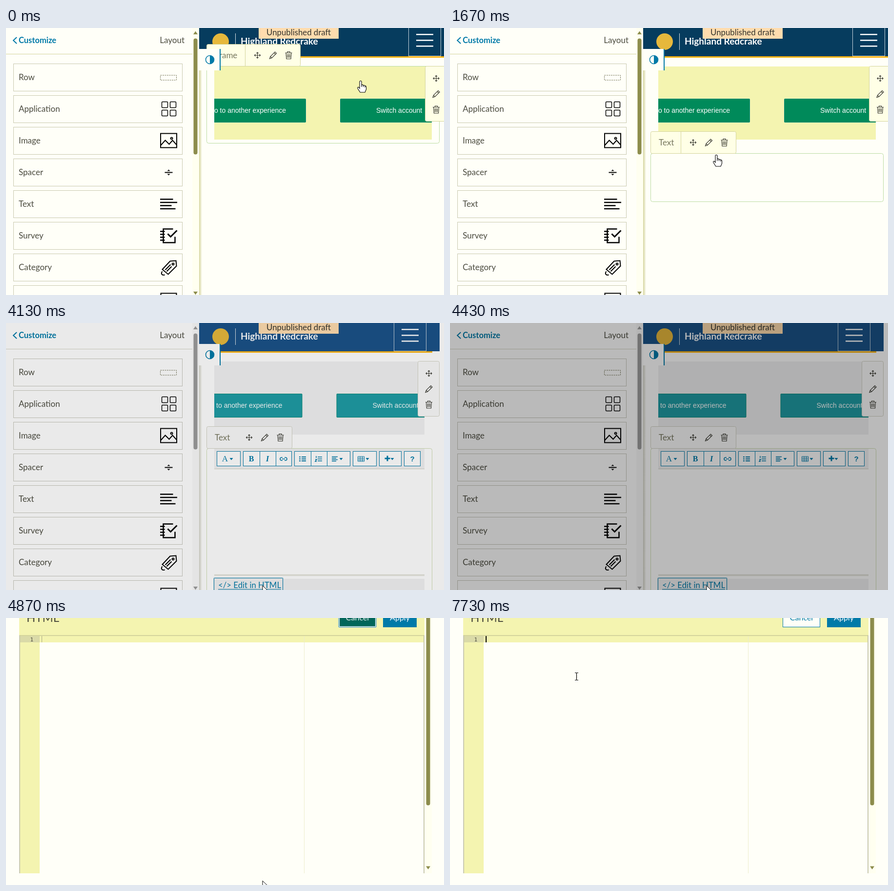
An HTML page with a canvas for the animation above (8000 ms loop, 898 px wide and 548 px high).

```html
<!DOCTYPE html>
<html lang="en">
<head>
<meta charset="utf-8">
<title>Layout editor</title>
<style>
html, body { margin: 0; width: 100%; height: 100%; overflow: hidden; background: #fffff8; }
canvas { display: block; width: 898px; height: 548px; }
</style>
</head>
<body>
<canvas id="stage" width="898" height="548"></canvas>
<script>
const W = 898, H = 548, LOOP = 8000;
const out = document.getElementById('stage').getContext('2d');
const layer = document.createElement('canvas');
layer.width = W;
layer.height = H;
const off = layer.getContext('2d');
let c = out;

// warm tints in full light, neutral ones while dimmed
const WARM = { paper: '#fffff8', soft: '#ffffe6', panel: '#f4f4b0', edge: '#d4d49c', row: '#c9c9b0',
  thumb: '#8c8c4c', track: '#fffff0', navy: '#063c5e', button: '#008a5a', cell: '#dadaa8' };
const COOL = { paper: '#ffffff', soft: '#fafafa', panel: '#f1f1f2', edge: '#d2d2c4', row: '#c6c6bc',
  thumb: '#9c9c9c', track: '#f8f8f8', navy: '#1a5288', button: '#1f9ca4', cell: '#dcdcdc' };
let pal = WARM;

const BLUE = '#007aa8', INK = '#4c4c40';
const SANS = 'Lato, sans-serif', ARIAL = '"Liberation Sans", Arial, sans-serif';
const SERIF = '"Liberation Serif", serif', MONO = '"DejaVu Sans Mono", monospace';

const clamp = v => Math.max(0, Math.min(1, v));
const ramp = (t, a, b) => clamp((t - a) / (b - a));
const smooth = p => p * p * (3 - 2 * p);

function box(x, y, w, h, fill) {
  c.fillStyle = fill;
  c.fillRect(x, y, w, h);
}
function frame(x, y, w, h, color, lw = 1) {
  c.strokeStyle = color;
  c.lineWidth = lw;
  c.strokeRect(x + .5, y + .5, w - 1, h - 1);
}
function round(x, y, w, h, r, fill, stroke) {
  c.beginPath();
  c.roundRect(x + .5, y + .5, w - 1, h - 1, r);
  if (fill) { c.fillStyle = fill; c.fill(); }
  if (stroke) { c.strokeStyle = stroke; c.lineWidth = 1; c.stroke(); }
}
function text(s, x, y, font, color, align = 'left') {
  c.font = font;
  c.fillStyle = color;
  c.textAlign = align;
  c.fillText(s, x, y);
}
// SVG path centred on x, y
function icon(d, x, y, stroke, lw = 1, fill) {
  const p = new Path2D(d);
  c.save();
  c.translate(x, y);
  if (fill) { c.fillStyle = fill; c.fill(p); }
  if (stroke) { c.strokeStyle = stroke; c.lineWidth = lw; c.stroke(p); }
  c.restore();
}
function disc(x, y, r, fill) {
  c.fillStyle = fill;
  c.beginPath();
  c.arc(x, y, r, 0, 7);
  c.fill();
}

const MOVE = 'M-6 0H6M0-6V6M-4-2L-6 0L-4 2M4-2L6 0L4 2M-2-4L0-6L2-4M-2 4L0 6L2 4';
const PENCIL = 'M-7 7L-5.500 2.500L4-7L7-4L-2.500 5.500ZM2-5L5-2M-5.500 2.500L-2.500 5.500';
const TRASH = 'M-7-5H7M-2.500-5V-7.500H2.500V-5M-5.500-5L-4.500 7.500H4.500L5.500-5M-2.500-2.500V5M0-2.500V5M2.500-2.500V5';
const DOWN = 'M-3.500-2H3.500L0 2.500Z', UP = 'M-4.500 3H4.500L0-3.500Z', DROP = 'M-4.500-3H4.500L0 3.500Z';
const HAND = 'M-2 12V1.500A2 2 0 0 1 2 1.500V8C3 7 5 7 5.500 9C7 8 8.500 8.500 9 10C10.500 9.500 11.500 10.500 11.500 12V17L9 23H-1L-6 15C-7 13-5 11.500-3.500 13L-2 15ZM2 8V12M5.500 9V12M9 10V13';
const BEAM = 'M-3.500-7.500H-1L0-7L1-7.500H3.500M0-7V7M-3.500 7.500H-1L0 7L1 7.500H3.500';
const ARROW = 'M0 0V16L4 12.500L6.500 18.500L9 17.500L6.500 11.500H12Z';

const ROWS = ['Row', 'Application', 'Image', 'Spacer', 'Text', 'Survey', 'Category'];

function rowIcon(i, y) {
  const x = 333.5, K = '#000';
  if (i === 0) {
    c.setLineDash([3, 1.5]);
    frame(316, y - 5, 34, 11, '#77775c');
    c.setLineDash([]);
  } else if (i === 1) {
    for (const [dx, dy] of [[-14, -15], [3, -15], [-14, 2], [3, 2]]) {
      c.beginPath();
      c.roundRect(x + dx, y + dy, 12, 12, 1.5);
      c.strokeStyle = K;
      c.lineWidth = 1.5;
      c.stroke();
    }
  } else if (i === 2) {
    icon('M-16.500-15H16.500V14H-16.500ZM-16 9L-7-1L1 7L8-1L16 8M6-7a2 2 0 1 0 .1 0', x, y, K, 2);
  } else if (i === 3) {
    icon('M-8 0H8', x, y, K, 2);
    icon('M-3-3H3L0-6ZM-3 3H3L0 6Z', x, y, null, 1, K);
  } else if (i === 4) {
    icon('M-17.500-10H9M-17.500-3.500H17.500M-17.500 3H6M-17.500 9.500H14', x, y, K, 2.5);
  } else if (i === 5) {
    icon('M9-14H-11V14H13V2M-17.500-9H-8M-17.500-3H-8M-17.500 3H-8M-17.500 9H-8', x, y, K, 2.5);
    icon('M-2-4L4 2L17-11', x, y, K, 3);
  } else if (i === 6) {
    icon('M-13 4L3-13L15-14L16-3L-1 14ZM9-9a2 2 0 1 0 .1 0M-7 5L4-6M-4 8L6-2M-13 8C-17 13-13 17-8 15', x, y, K, 2);
  }
}

function sidebar() {
  box(0, 0, 396, H, pal.paper);
  icon('M4-6.500L-3 0L4 6.500', 18, 25.5, BLUE, 2);
  text('Customize', 26, 31, 'bold 16.500px ' + SANS, BLUE);
  text('Layout', 366, 31, '17px ' + SANS, INK, 'right');
  box(0, 53, 382, 1, pal.edge);
  for (let i = 0; i < 8; i++) {
    const y = 73 + 65 * i;
    frame(15, y, 347, 57, pal.row);
    if (i < 7) {
      text(ROWS[i], 26, y + 34, '17px ' + SANS, INK);
      rowIcon(i, y + 28.5);
    }
  }
  frame(317, 544, 33, 24, '#000', 2);
  box(382, 0, 14, H, pal.track);
  round(384, 21, 9, 239, 4, pal.thumb);
  icon(UP, 388.5, 10, null, 1, pal.thumb);
  icon(DROP, 388.5, 544, null, 1, pal.thumb);
  const g = c.createLinearGradient(396, 0, 402, 0);
  g.addColorStop(0, pal.edge);
  g.addColorStop(1, pal.paper);
  box(396, 87, 6, H, g);
}

function header(draftX, hamX, headR, lineR) {
  box(396, 0, headR - 396, 58, pal.navy);
  box(396, 58, lineR - 396, 3, '#fcb514');
  disc(440, 28, 17, '#e6b83c');
  box(470, 11, 1, 34, '#dfe6ea');
  text('Highland Redcrake', 481, 34, 'bold 19px ' + SANS, '#fff');
  frame(hamX, -1, 67, 59, '#c8d4dc');
  for (const y of [12, 24, 36]) box(hamX + 16, y, 35, 2.5, '#fff');
  box(draftX, 0, 164, 22, '#ffdcae');
  text('Unpublished draft', draftX + 82, 15, '16.800px ' + SANS, '#33332c', 'center');
}

function tools(x, y, vertical) {
  [MOVE, PENCIL, TRASH].forEach((d, i) =>
    icon(d, x + (vertical ? 0 : i * 32), y + (vertical ? i * 32 : 0), '#3c3c34', 1.2));
}

function tab(y, w, label, div) {
  round(411, y, w, 46, 3, pal.soft, pal.edge);
  text(label, 428, y + 29, '17px ' + SANS, '#77775f');
  if (div) box(div, y + 1, 1, 44, pal.edge);
  tools((div || 473) + 25.5, y + 23);
}

function cards(d, clipR, toolX) {
  c.save();
  c.beginPath();
  c.rect(427, 79, clipR - 427, 150);
  c.clip();
  box(427, 79, 460, 150, pal.panel);
  for (const [x, w] of [[400, 215], [685, 220]]) {
    round(x + d, 145, w, 49, 1, pal.button, '#0a8a78');
  }
  text('Go to another experience', 574 + d, 174, '14px ' + ARIAL, '#fff', 'right');
  text('Switch account', 759 + d, 174, '14px ' + ARIAL, '#fff');
  c.restore();
  round(toolX, 78, 45, 114, 3, pal.soft, pal.edge);
  tools(toolX + 23, 103.5, true);
}

function editor() {
  round(411, 257, 463, 320, 4, pal.paper, '#cfdcb4');
  box(427, 258, 431, 42, pal.panel);
  box(427, 299, 431, 1, pal.edge);
  for (const g of [[432, 481], [486, 520, 553, 586], [591, 625, 658, 706], [711, 760], [765, 811], [816, 850]]) {
    box(g[0], 263, g.at(-1) - g[0], 31, pal.paper);
    for (let i = 1; i < g.length; i++) frame(g[i - 1], 263, g[i] - g[i - 1] + (i < g.length - 1), 31, BLUE);
  }
  text('A', 449, 284, '17px ' + SERIF, BLUE, 'center');
  text('B', 503, 284, 'bold 16px ' + SERIF, BLUE, 'center');
  text('I', 536, 284, 'italic bold 16px ' + SERIF, BLUE, 'center');
  icon('M-2-3H-4A3 3 0 0 0-4 3H-2M2-3H4A3 3 0 0 1 4 3H2M-3 0H3', 569, 279, BLUE, 1.6);
  icon('M-7-4H-4M-7 0H-4M-7 4H-4M-2-4H7M-2 0H7M-2 4H7', 608, 279, BLUE, 2);
  icon('M-5-6V-2M-7 1H-4L-7 5H-4M-2-4H7M-2 0H7M-2 4H7', 641, 279, BLUE, 1.5);
  icon('M-6-4.500H6M-6-1.500H3M-6 1.500H6M-6 4.500H3', 674, 279, BLUE, 1.5);
  icon('M-6.500-5H6.500V5H-6.500ZM-6.500-1.500H6.500M-6.500 2H6.500M-2-5V5M2.500-5V5', 728, 279, BLUE, 1);
  icon('M-5.500 0H5.500M0-5.500V5.500', 782, 278, BLUE, 3);
  for (const x of [462, 687, 741, 792]) icon(DOWN, x, 279, null, 1, BLUE);
  text('?', 833, 284, 'bold 15px ' + ARIAL, BLUE, 'center');
  box(427, 516, 431, 1, pal.edge);
  box(427, 518, 431, 1, pal.edge);
  box(427, 525, 431, 23, pal.panel);
}

function link(focused) {
  if (focused) {
    round(425, 522, 144, 32, 1, '#b4d4e2');
    round(426, 523, 142, 30, 1, pal.panel, BLUE);
  }
  const font = '16.800px ' + SANS, label = '</> Edit in HTML';
  text(label, 435, 544, font, BLUE);
  box(435, 546, c.measureText(label).width, 1, BLUE);
}

function contrastTab() {
  box(396, 43, 44, 44, pal.paper);
  box(438, 43, 2, 44, BLUE);
  c.beginPath();
  c.arc(418, 65, 8.5, 0, 7);
  c.strokeStyle = BLUE;
  c.lineWidth = 1.6;
  c.stroke();
  icon('M0-8.500A8.500 8.500 0 0 1 0 8.500Z', 418, 65, null, 1, BLUE);
}

// mode: frame, text, edit, modal
function page(mode) {
  const wide = mode === 'frame' || mode === 'text';
  box(0, 0, W, H, pal.paper);
  if (wide) header(518, 825, W, W);
  else if (mode === 'edit') header(511, 810, 889, 889);
  else header(518, 795, 889, 874);
  if (mode === 'frame') round(411, 78, 478, 159, 4, null, '#bcdca4');
  if (wide) cards(0, 873, 859);
  else cards(-7.5, 858, 844);
  if (mode === 'frame') tab(33, 193, 'Frame', 490);
  else {
    if (wide) round(411, 257, 478, 100, 4, pal.paper, '#bcdca4');
    else {
      editor();
      link(mode === 'modal');
    }
    tab(212, 176, 'Text', wide ? 473 : 0);
  }
  if (mode === 'edit') {
    box(889, 0, 9, H, pal.track);
    round(892, -8, 9, 522, 4, pal.thumb);
    icon(DROP, 895, 544, null, 1, pal.thumb);
  }
  contrastTab();
  sidebar();
}

function modal(dy, focus, caret) {
  c.save();
  c.translate(0, dy);
  box(0, -200, W, 755, pal.paper);
  box(27, -60, 831, 96, pal.panel);
  text('HTML', 42, 8, '24px ' + SANS, '#4a4a3c');
  box(683, -21, 75, 39, pal.paper);
  frame(682, -22, 77, 41, BLUE);
  text('Cancel', 720.5, 5, '16px ' + SANS, BLUE, 'center');
  if (focus > 0) {
    c.globalAlpha = focus;
    round(681, -22, 79, 42, 2, '#5aa4c4');
    box(683, -22, 75, 40, '#fff');
    box(684, -22, 73, 39, '#00665a');
    text('Cancel', 720.5, 5, '16px ' + SANS, '#e8f4f0', 'center');
    c.globalAlpha = 1;
  }
  box(773, -22, 69, 41, BLUE);
  text('Apply', 807.5, 5, '16px ' + SANS, '#fff', 'center');
  box(28, 36, 41, 488, pal.panel);
  box(69, 37, 788, 13, pal.panel);
  box(29, 37, 40, 13, pal.cell);
  text('1', 56, 48, '11px ' + MONO, '#4a4a3c', 'right');
  box(27, 35, 831, 2, pal.edge);
  box(27, 36, 2, 488, pal.row);
  box(856, 36, 2, 488, pal.row);
  box(611, 38, 1, 486, '#ececcc');
  box(73, 37, caret ? 2 : 1, 13, caret ? '#000' : '#a8a884');
  box(858, -100, 15, 624, pal.track);
  round(861, -100, 9, 485, 4, pal.thumb);
  icon(DROP, 865.5, 512.5, null, 1, pal.thumb);
  c.restore();
}

function over(alpha, draw) {
  if (alpha <= 0) return;
  off.clearRect(0, 0, W, H);
  c = off;
  draw();
  c = out;
  out.globalAlpha = alpha;
  out.drawImage(layer, 0, 0);
  out.globalAlpha = 1;
}

const PATH = [[0, 727, 109], [30, 727, 109], [830, 599, 306], [870, 599, 306], [1670, 546, 261],
  [1900, 526, 234], [2770, 526, 234], [2800, 532, 241], [2990, 532, 241], [3000, 528, 329],
  [3330, 526, 542], [3820, 526, 542], [3830, 526, 539], [6000, 526, 540], [6300, 381, 19],
  [7230, 381, 19], [7500, 259, 120], [LOOP, 259, 120]];

function pointer(t) {
  const i = PATH.findIndex(k => k[0] > t);
  const [t0, x0, y0] = PATH[i - 1], [t1, x1, y1] = PATH[i];
  const p = smooth(ramp(t, t0, t1));
  const x = x0 + (x1 - x0) * p, y = y0 + (y1 - y0) * p;
  if (t < 3200) icon(HAND, x, y, '#000', 1.1, '#fff');
  else if (t > 7230 && y > 36) icon(BEAM, x + .5, y, '#000', 1.2);
  else icon(ARROW, x, y, '#000', 1, '#fff');
}

function layoutScene(t) {
  const swap = ramp(t, 300, 500), edit = ramp(t, 1950, 2250);
  page(edit === 1 ? 'edit' : swap === 1 ? 'text' : 'frame');
  if (swap < 1) over(swap, () => page('text'));
  if (edit < 1) over(edit, () => page('edit'));
  if (t >= 3470) box(427, 302, 1, 19, '#000');
  if (t >= 3000) over(1 - ramp(t, 3010, 3100), () => {
    icon('M-5 2H5L0-3Z', 536, 300, null, 1, '#f0f0a8');
    round(491, 302, 91, 24, 2, '#f0f0a8');
    text('Italic (Ctrl+I)', 536.5, 319, '14px ' + SANS, '#fffff4', 'center');
  });
}

function modalScene(t) {
  const show = ramp(t, 4503, 4653), rest = 1 - ramp(t, 4520, 4820);
  const focus = ramp(t, 4800, 4870) * (1 - ramp(t, 7000, 7070));
  if (t > 4040 && show < 1) pal = COOL;
  if (rest > 0) {
    page('modal');
    box(0, 0, W, H, `rgba(0,0,0,${.5 * ramp(t, 4000, 4800)})`);
  }
  over(show, () => modal(-158 * Math.pow(rest, 1.7), focus, t >= 7730));
}

function render(t) {
  c = out;
  pal = WARM;
  if (t < 4000) layoutScene(t);
  else modalScene(t);
  pointer(t);
}

const start = performance.now();
function tick() {
  render((performance.now() - start) % LOOP);
  requestAnimationFrame(tick);
}
tick();
</script>
</body>
</html>
```
